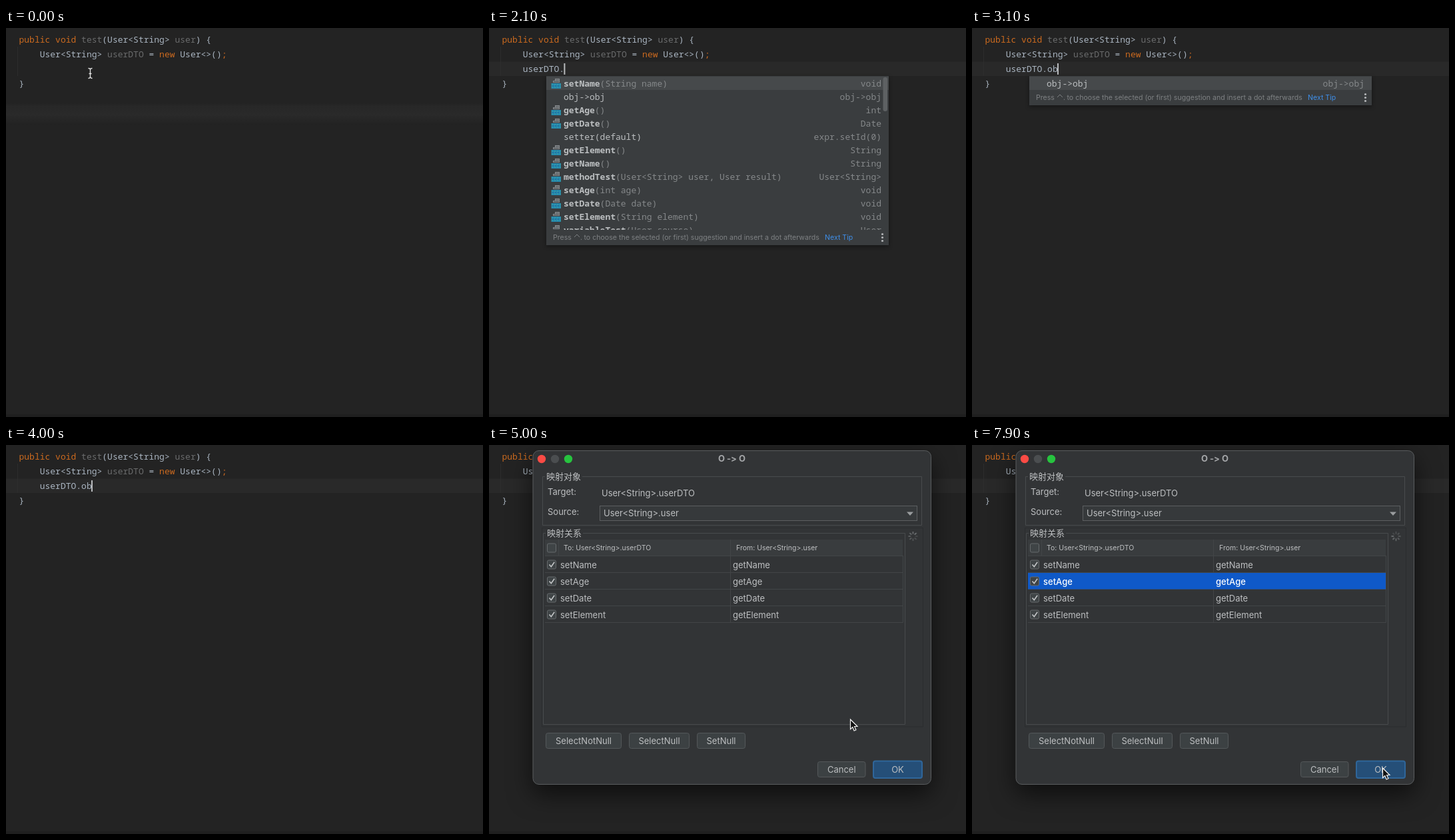
Write an HTML page that moves like this. It is 716x584 px and loops after 8000 ms.

```html
<!DOCTYPE html>
<html lang="en">
<head>
<meta charset="utf-8">
<title>Object mapping in the editor</title>
<style>
html, body { margin: 0; width: 100%; height: 100%; overflow: hidden; background: #232323; }
#stage { display: block; width: 716px; height: 584px; }
text { white-space: pre; font-variant-ligatures: none; font-feature-settings: "calt" 0; }
.code { font: 500 13px "Noto Sans Mono", "DejaVu Sans Mono", monospace; fill: #a9b4c0; }
.kw { fill: #cb6a1f; }
.dim { fill: #6a6b6c; }
.item { fill: #bcbfc1; }
.item .bold { font-weight: 700; }
.item .args, .type { fill: #85888a; }
.match { fill: #4797e6; }
.hint { font: 10.6px Inter, "Liberation Sans", sans-serif; fill: #7e8183; }
.hint .link { fill: #3f8fe8; }
.ui { font: 13px Inter, "Noto Sans CJK SC", "Noto Sans CJK", sans-serif; fill: #bdbfc1; }
.ui .head { font-size: 10.5px; }
.ui .mid { text-anchor: middle; }
.line { fill: none; stroke: #484b4d; }
.grid { fill: none; stroke: #424547; }
.btn { fill: #3c4143; stroke: #54585a; }
.pop { filter: drop-shadow(0 2px 3px #0006); }
.dialog { filter: drop-shadow(0 14px 18px #0009); }
#spin { animation: spin .8s steps(8) infinite; }
#arrow { animation: move 8s linear infinite; }
@keyframes spin { to { transform: rotate(360deg); } }
@keyframes move {
  0%, 58.75% { transform: translate(560px, 440px); }
  62.5%, 66.25% { transform: translate(542px, 412px); }
  77.5%, 88.75% { transform: translate(418px, 207px); }
  97.5%, 100% { transform: translate(616px, 485px); }
}
</style>
</head>
<body>
<script>
const LOOP = 8000, CH = 7.8, LEFT = 50.7;
let css = '', count = 0;

const esc = s => s.replace(/</g, '&lt;').replace(/>/g, '&gt;');
const text = (x, y, s, cls = '', extra = '') => `<text x="${x}" y="${y}" class="${cls}" ${extra}>${esc(s)}</text>`;
const rect = (x, y, w, h, attrs) => `<rect x="${x}" y="${y}" width="${w}" height="${h}" ${attrs}/>`;
const path = (d, attrs) => `<path d="${d}" ${attrs}/>`;
const span = (cls, s) => `<tspan class="${cls}">${esc(s)}</tspan>`;

// Visible only between two moments of the loop
function show(from, to, body) {
  const id = 'part' + count++, at = ms => ms / LOOP * 100 + '%';
  css += `#${id}{animation:${id} ${LOOP}ms step-end infinite}` +
    `@keyframes ${id}{0%{opacity:0}${at(from)}{opacity:1}${at(to)}{opacity:0}}`;
  return `<g id="${id}">${body}</g>`;
}

function editor() {
  const line = (x, y, body) => `<text class="code" x="${x}" y="${y}">${body}</text>`;
  return path('M17.5 28V72', 'stroke="#2d2d2d"') +
    line(19.5, 22, span('kw', 'public void ') + span('dim', 'test') + esc('(User<String> ') + span('dim', 'user') + ') {') +
    line(LEFT, 44, esc('User<String> ') + span('dim', 'userDTO') + ' = ' + span('kw', 'new ') + esc('User<>()') + span('kw', ';')) +
    line(19.5, 88, '}');
}

const typed = (from, to, s) => show(from, to,
  text(LEFT, 66, s, 'code') + rect(LEFT + CH * s.length - .7, 53, 2, 17, 'fill="#b9bbbd"'));

const methodIcon = y => path(`M96 ${y + 9}V${y + 6}h3V${y + 3}h7v6z`, 'fill="#85898c"') +
  path(`M97 ${y + 7.5}h8M100 ${y + 5}h5`, 'stroke="#4b4f52"') +
  rect(93.5, y + 10, 14.5, 8, 'fill="#2487b0"') +
  path(`M94 ${y + 12}h14M94 ${y + 16}h14`, 'stroke="#3fa79a" stroke-dasharray="2 2"') +
  path(`M95 ${y + 14}h12`, 'stroke="#1f5f92" stroke-dasharray="2 2"');

const varIcon = (y, letter) => `<circle cx="38" cy="${y + 10}" r="6.7" fill="#c98835"/>` +
  text(38, y + 13, letter, '', 'text-anchor="middle" style="font:9px Inter,sans-serif;fill:#3a2c18"');

// Each row: [icon, label markup, type]
function popup(x, right, height, rows, selected) {
  const w = right - x, end = 73 + height;
  const body = rows.map(([icon, label, type], i) => {
    const y = 73 + i * 20;
    return (i === selected ? rect(x, y, w, 20, 'fill="#46494b"') : '') + icon(y) +
      `<text class="code item" x="${x + 26}" y="${y + 14.5}">${label}</text>` +
      text(right - 11, y + 14.5, type, 'code type', 'text-anchor="end"');
  }).join('');
  const dots = [-5, 0, 5].map(d => `<circle cx="${right - 9.5}" cy="${end + 11.5 + d}" r="1.6" fill="#b4b6b8"/>`).join('');
  return `<g class="pop">${rect(x, 72, w, height + 24, 'fill="#3a3d3f"')}
    <svg x="0" y="73" width="716" height="${height}" viewBox="0 73 716 ${height}">${body}</svg>
    <g class="hint">${text(x + 10, end + 15, 'Press')}
      ${path(`M${x + 42} ${end + 11}l4 -4l4 4`, 'fill="none" stroke="#7e8183"')}
      ${text(x + 51, end + 15, '.')}
      ${text(x + 56.5, end + 15, 'to choose the selected (or first) suggestion and insert a dot afterwards')}
      ${text(x + 418, end + 15, 'Next Tip', 'link')}</g>${dots}</g>`;
}

const variables = (prefix, selected) => popup(24, 538, 40, [['p', 'user'], ['v', 'userDTO']].map(([letter, name]) =>
  [y => varIcon(y, letter), span('match', name.slice(0, prefix)) + name.slice(prefix), 'User<String>']), selected);

const noIcon = () => '';
const method = (name, args, type) => [methodIcon, span('bold', name) + span('args', args), type];
const mapRow = [noIcon, esc('obj->obj'), 'obj->obj'];
const members = [
  method('setName', '(String name)', 'void'),
  mapRow,
  method('getAge', '()', 'int'),
  method('getDate', '()', 'Date'),
  [noIcon, 'setter(default)', 'expr.setId(0)'],
  method('getElement', '()', 'String'),
  method('getName', '()', 'String'),
  method('methodTest', '(User<String> user, User result)', 'User<String>'),
  method('setAge', '(int age)', 'void'),
  method('setDate', '(Date date)', 'void'),
  method('setElement', '(String element)', 'void'),
  method('variableTest', '(User source)', 'User')
];
const memberList = (height, rows) => popup(86, 600, height, rows, 0);

function checkbox(y, on) {
  return rect(87.5, y - 6.5, 13, 13, 'rx="2" fill="#3f4446" stroke="#666a6c"') +
    (on ? path(`M90.5 ${y}l2.8 3.2l4.9 -7`, 'fill="none" stroke="#c3c5c7" stroke-width="1.6"') : '');
}

function button(x, y, w, label) {
  return rect(x + .5, y + .5, w, 23, 'rx="3" class="btn"') + text(x + w / 2 + .5, y + 17, label, 'mid');
}

const rowTop = i => 167 + i * 25;
const rowBack = (i, color) => rect(84, rowTop(i), 537, 24.5, `fill="${color}"`);
const rowText = (i, name, style = '') =>
  text(107, rowTop(i) + 17.5, 'set' + name, '', style) + text(366, rowTop(i) + 17.5, 'get' + name, '', style);
const hover = (i, from, to) => show(from, to, rowBack(i, '#3a3f44'));

function spinner() {
  let spokes = '';
  for (let i = 0; i < 8; i++)
    spokes += path('M0 -3.4V-7', `stroke="#85898b" stroke-width="1.5" opacity="${.3 + i * .08}" transform="rotate(${i * 45})"`);
  return `<g transform="translate(636.5 137)"><g id="spin">${spokes}</g></g>`;
}

function dialog() {
  const fields = ['Name', 'Age', 'Date', 'Element'];
  const lights = [[79, '#fb4b45'], [99, '#4b4e50'], [119, '#27c33f']]
    .map(([x, c]) => `<circle cx="${x}" cy="21" r="6.2" fill="${c}"/>`).join('');
  return `<g class="dialog">${rect(66, 8.5, 597.5, 501, 'rx="9" fill="#323436" stroke="#5a5d5f"')}</g><g class="ui">` +
    lights + text(364.5, 25, 'O -> O', 'mid', 'font-weight="700" style="fill:#a6a8aa"') +
    path('M84 47.5H80.5V120.5H649.5V47.5H140', 'class="line"') + text(86, 52, '映射对象') +
    text(88, 75, 'Target:') + text(169, 77, 'User<String>.userDTO') + text(88, 105, 'Source:') +
    rect(166.5, 91.5, 476, 22, 'fill="#36393b" stroke="#5c5f61"') + text(172, 107.3, 'User<String>.user') +
    path('M627 100.5h10l-5 5.5z', 'fill="#9a9d9f"') +
    rect(79.5, 124.5, 572, 298.5, 'fill="none" stroke="#2b2d2f"') +
    path('M85 132.5H81.5V419.5H624.5V132.5H141', 'class="line"') + text(87, 137, '映射关系') +
    rect(84, 142, 537, 24, 'fill="#393c3e"') +
    hover(3, 5941, 6051) + hover(2, 6051, 6160) + hover(1, 6160, 6800) +
    hover(2, 7125, 7188) + hover(3, 7188, 7250) +
    path('M84 166.5H621M84 191.5H621M84 216.5H621M84 241.5H621M84 266.5H621.5V166M362.5 142V266M104.5 142V166', 'class="grid"') +
    text(112, 158, 'To: User<String>.userDTO', 'head') + text(371, 158, 'From: User<String>.user', 'head') +
    fields.map((f, i) => rowText(i, f)).join('') +
    show(6800, LOOP, rowBack(1, '#0f59c8') + rowText(1, 'Age', 'style="fill:#fff;font-weight:500"')) +
    checkbox(154.5, false) + fields.map((f, i) => checkbox(rowTop(i) + 12.5, true)).join('') +
    spinner() +
    button(85, 432, 113, 'SelectNotNull') + button(210, 432, 90, 'SelectNull') + button(312, 432, 72, 'SetNull') +
    button(493, 475, 71.5, 'Cancel') +
    rect(577, 474.5, 73, 25.5, 'rx="3" fill="#254f78" stroke="#2f669a" stroke-width="2"') +
    text(613.5, 492, 'OK', 'mid') + '</g>';
}

const ibeam = path('M123.5 60.5q3 0 3 2V73q0 2.5 -3 2.5M129.5 60.5q-3 0 -3 2V73q0 2.5 3 2.5M124.5 68.5h4',
  'fill="none" stroke="#e4e4e4" stroke-width="1.3"');
const arrow = path('M0.5 0V14.6L3.8 11.5L6.1 17L8.9 15.8L6.6 10.5H11Z', 'id="arrow" fill="#111" stroke="#f2f2f2" stroke-width="1.2"');

const scene = [
  rect(0, 0, 716, 584, 'fill="#232323"'),
  rect(0, 580, 716, 4, 'fill="#1f1f1f"'),
  show(0, 700, rect(0, 113, 716, 32, 'fill="url(#glow)"')),
  show(200, LOOP, rect(0, 50.5, 716, 21.5, 'fill="#292929"')),
  editor(),
  typed(200, 500, ''),
  typed(500, 900, 'u'),
  typed(900, 1500, 'us'),
  typed(1500, 1600, 'userDTO'),
  typed(1600, 2800, 'userDTO.'),
  typed(2800, 3100, 'userDTO.o'),
  typed(3100, 4100, 'userDTO.ob'),
  show(0, 500, ibeam),
  show(600, 900, variables(1, 0)),
  show(900, 1300, variables(2, 0)),
  show(1300, 1500, variables(2, 1)),
  show(1700, 1900, memberList(100, members.slice(0, 5))),
  show(1900, 2800, memberList(230, members) + rect(591.5, 74, 6.5, 51, 'rx="3" fill="#5e6163"')),
  show(2800, 3700, memberList(20, [mapRow])),
  show(4200, LOOP, dialog()),
  show(4700, LOOP, arrow)
].join('');

document.body.innerHTML = `<style>${css}</style>
<svg id="stage" viewBox="0 0 716 584" xmlns="http://www.w3.org/2000/svg">
<defs><linearGradient id="glow" x2="0" y2="1"><stop stop-color="#292929" stop-opacity="0"/>
<stop offset=".1" stop-color="#272727"/><stop offset=".55" stop-color="#2a2a2a"/>
<stop offset="1" stop-color="#292929" stop-opacity="0"/></linearGradient></defs>${scene}</svg>`;
</script>
</body>
</html>
```
